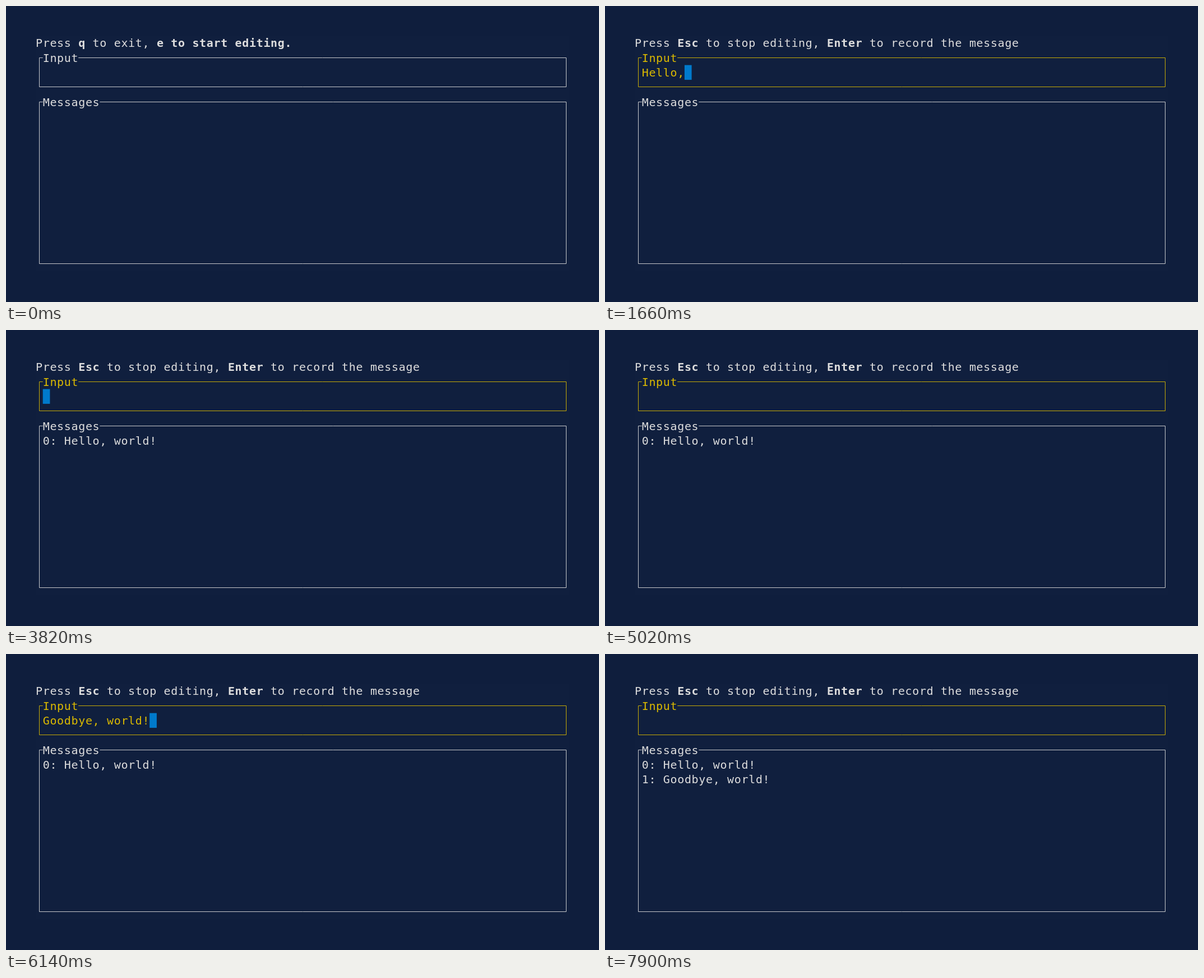
Animation of 1058 by 529 pixels, one loop 8 s. Source, as an HTML page with a canvas:

```html
<!DOCTYPE html>
<html lang="en">
<head>
<meta charset="utf-8">
<title>Terminal input</title>
<style>
  html, body { margin: 0; width: 100%; height: 100%; overflow: hidden; background: #0f1e3d; }
  canvas { display: block; }
</style>
</head>
<body>
<canvas id="stage" width="1058" height="529"></canvas>
<script>
const ctx = document.getElementById('stage').getContext('2d');
const LOOP = 8000, TICK = 40;
const LEFT = 53, TOP = 53, CELL_W = 12.7, CELL_H = 26.3, COLS = 75;
const WHITE = '#dddddd', YELLOW = '#dbba00', BLUE = '#007acc';
const FIRST = 'Hello, world!', SECOND = 'Goodbye, world!';
const BLINKS = [540, 1060, 1420, 2500, 3060, 3620, 3820, 5020, 5460, 6780, 7340, 7900];

const colX = col => LEFT + col * CELL_W;
const rowY = row => TOP + row * CELL_H;

// Writes on the character grid; ** switches bold on and off.
function write(text, col, row, color) {
  ctx.fillStyle = color;
  text.split('**').forEach((part, i) => {
    ctx.font = `${i % 2 ? 'bold ' : ''}20px "DejaVu Sans Mono", monospace`;
    for (const char of part) ctx.fillText(char, colX(col++), Math.round(rowY(row) + 20.3));
  });
}

// Box outline through the cell centres, open where the title stands.
function box(title, top, bottom, color) {
  const lineY = row => Math.floor(rowY(row) + CELL_H / 2 - 0.2) + 0.5;
  const x1 = 59.5, x2 = 999.5, y1 = lineY(top), y2 = lineY(bottom);
  ctx.strokeStyle = color;
  ctx.lineWidth = 0.9;
  ctx.beginPath();
  ctx.moveTo(colX(1), y1);
  ctx.lineTo(x1, y1);
  ctx.lineTo(x1, y2);
  ctx.lineTo(x2, y2);
  ctx.lineTo(x2, y1);
  ctx.lineTo(colX(1 + title.length), y1);
  ctx.stroke();
  write(title, 1, top, color);
}

function typed(t) {
  if (t < 2020) return FIRST.slice(0, Math.max(0, (t - 1420) / TICK));
  if (t >= 6220) return '';
  const count = t < 5780 ? Math.min(6, (t - 5460) / TICK) : 7 + (t - 5780) / 45;
  return SECOND.slice(0, Math.max(0, count));
}

function draw(time) {
  const t = Math.floor((time - 20) / TICK) * TICK + 20;
  const editing = t >= 500;
  ctx.fillStyle = '#0f1e3d';
  ctx.fillRect(0, 0, 1058, 529);
  ctx.fillStyle = '#101f3e';
  ctx.fillRect(LEFT, TOP, COLS * CELL_W, 16 * CELL_H);

  write(editing
    ? 'Press **Esc** to stop editing, **Enter** to record the message'
    : 'Press **q** to exit, **e to start editing.**', 0, 0, WHITE);
  box('Input', 1, 3, editing ? YELLOW : WHITE);
  box('Messages', 4, 15, WHITE);

  const input = typed(t);
  write(input, 1, 2, YELLOW);
  if (BLINKS.filter(at => at <= t).length % 2) {
    ctx.fillStyle = BLUE;
    ctx.fillRect(colX(1 + input.length), rowY(2), CELL_W, CELL_H);
  }
  if (t >= 2020) write('0: ' + FIRST, 1, 5, WHITE);
  if (t >= 6220) write('1: ' + SECOND, 1, 6, WHITE);
}

function tick() {
  draw(performance.now() % LOOP);
  requestAnimationFrame(tick);
}
tick();
</script>
</body>
</html>
```
